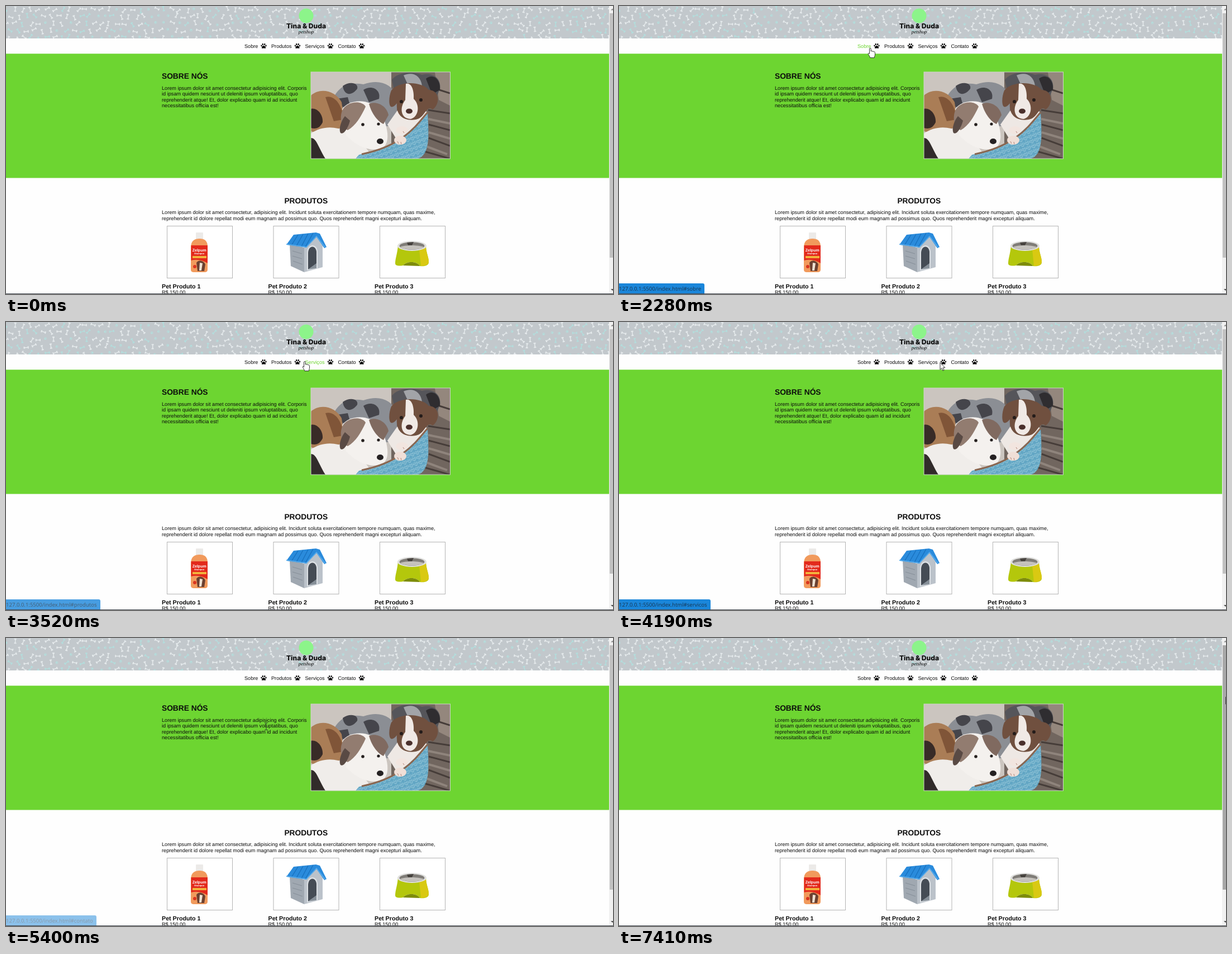
An HTML page for the animation above (8000 ms loop, 1087 px wide and 515 px high).

```html
<!DOCTYPE html>
<html lang="pt-BR">
<head>
<meta charset="utf-8">
<title>Petshop</title>
<style>
  html, body { margin: 0; width: 100%; height: 100%; overflow: hidden; background: #fefefe; }
  svg { position: absolute; left: 0; top: 0; display: block; }
  text { font-family: "Liberation Sans", Arial, sans-serif; font-size: 9.17px; fill: #0c0c0c; text-rendering: geometricPrecision; }
  .h2 { font-size: 13.75px; font-weight: 700; }
  .h3 { font-size: 10.7px; font-weight: 700; }
  .brand { font: 800 12.1px Inter, sans-serif; text-anchor: middle; }
  .script { font: italic 8.8px "Liberation Serif", serif; text-anchor: middle; }
  .label { font-weight: 700; fill: #fff; text-anchor: middle; }
  .card { fill: #fff; stroke: #b4b4b4; }
  #status {
    position: absolute; left: 0; top: 496px; height: 19px; padding-right: 6px; opacity: 0;
    background: #1a86da; color: #17344f; border-radius: 0 3px 0 0; white-space: nowrap;
    font: 9.55px/19px "Open Sans", "Noto Sans", sans-serif; text-rendering: geometricPrecision;
  }
</style>
</head>
<body>
<svg width="1087" height="515" viewBox="0 0 1087 515">
  <defs>
    <g id="bone">
      <path d="M-3.4 0H3.4" stroke="currentColor" stroke-width="1.5"/>
      <g fill="currentColor"><circle cx="-3.8" cy="-1" r="1.2"/><circle cx="-3.8" cy="1" r="1.2"/><circle cx="3.8" cy="-1" r="1.2"/><circle cx="3.8" cy="1" r="1.2"/></g>
    </g>
    <g id="paw">
      <path d="M0-.6C1.7-.6 3.6 1.8 3.6 3.2C3.6 4.9 1.6 4.1 0 4.1S-3.6 4.9-3.6 3.2C-3.6 1.8-1.7-.6 0-.6Z"/>
      <ellipse cx="-1.7" cy="-2.9" rx="1.2" ry="1.7" transform="rotate(-12 -1.7 -2.9)"/>
      <ellipse cx="1.7" cy="-2.9" rx="1.2" ry="1.7" transform="rotate(12 1.7 -2.9)"/>
      <ellipse cx="-4" cy="-.4" rx="1.1" ry="1.5" transform="rotate(-25 -4 -.4)"/>
      <ellipse cx="4" cy="-.4" rx="1.1" ry="1.5" transform="rotate(25 4 -.4)"/>
    </g>
    <pattern id="weave" width="9" height="9" patternUnits="userSpaceOnUse" patternTransform="rotate(-20)">
      <rect width="9" height="9" fill="#62a6c4"/><path d="M0 7L4.5 2L9 7M0 3L4.5-2L9 3" fill="none" stroke="#9bcbdc" stroke-width="1.1"/>
    </pattern>
    <clipPath id="frame"><rect x="546" y="118" width="249" height="155"/></clipPath>
    <clipPath id="top"><rect width="1080" height="58"/></clipPath>
  </defs>

  <rect width="1080" height="58" fill="#c2c8cc"/>
  <g id="bones" clip-path="url(#top)"></g>
  <circle cx="537.5" cy="17.5" r="13" fill="#8cf48a"/>
  <text class="brand" x="537.5" y="40.4">Tina &amp; Duda</text>
  <text class="script" x="537.5" y="48.8">petshop</text>
  <g id="nav"></g>

  <rect y="85.3" width="1080" height="222.2" fill="#6dd531"/>
  <text class="h2" x="279" y="130">SOBRE NÓS</text>
  <g id="about"></g>

  <g clip-path="url(#frame)">
    <path d="M546 118H795V273H546Z" fill="#cbc5bf"/>
    <path d="M690 118H795V273H690Z" fill="#71665f"/>
    <path d="M768 118H795V178L775 168Z" fill="#94877d"/>
    <path d="M756 186L795 192M757 212L795 222M757 236L795 250M742 258L795 273M776 150L795 156" stroke="#463d39" stroke-width="3"/>
    <path d="M756 202L795 210M757 226L795 237M750 250L790 265" stroke="#8f847c" stroke-width="4"/>
    <path d="M580 190C585 150 605 134 640 140C670 130 690 140 700 160V215H585Z" fill="#8b8e94"/>
    <path d="M603 143C615 134 632 137 629 148C620 160 606 162 603 143ZM640 150C655 140 672 150 668 166L650 172ZM592 166L612 163L617 181L590 180Z" fill="#45454b"/>
    <path d="M691 132C700 119 725 116 745 123C765 118 780 130 777 148L764 180L700 175Z" fill="#55555a"/>
    <path d="M712 124C728 117 742 124 745 142L722 146Z" fill="#a2a4a8"/>
    <path d="M752 130C765 119 779 132 777 150L763 158Z" fill="#2f2d30"/>
    <path d="M546 160C562 145 590 151 601 172L607 212C590 226 565 230 546 224Z" fill="#aa7d56"/>
    <path d="M572 163C587 158 603 176 604 203L587 206Z" fill="#805538"/>
    <path d="M546 184C557 181 568 194 567 208C561 220 553 220 546 218Z" fill="#382b27"/>
    <path d="M546 228C575 208 610 218 635 242L660 273H546Z" fill="#f0edea"/>
    <path d="M546 236C556 235 560 255 572 273H546Z" fill="#312b2a"/>
    <path d="M602 184C615 166 652 164 671 188C682 212 690 242 675 253C655 263 627 251 609 231Z" fill="#f4f1ee"/>
    <path d="M602 187C610 170 637 168 644 180C635 199 627 213 612 222C600 218 597 201 602 187Z" fill="#927c70"/>
    <path d="M650 175C666 169 682 180 685 195L676 211C666 207 655 193 650 175Z" fill="#806a60"/>
    <path d="M616 205C613 217 605 231 599 227C595 219 601 204 607 197Z" fill="#594a44"/>
    <circle cx="639" cy="212" r="2.8" fill="#25201f"/><circle cx="667" cy="211" r="2.6" fill="#25201f"/>
    <ellipse cx="670" cy="242" rx="6" ry="5" fill="#252122"/>
    <path d="M700 188C715 170 748 175 755 193L744 229L701 241L683 212Z" fill="#eee8e4"/>
    <path d="M690 151C702 135 742 133 757 150C778 151 777 177 764 185C752 176 751 200 734 203C710 207 698 193 700 174C684 193 684 165 690 151Z" fill="#70503f"/>
    <path d="M716 139C728 136 731 155 730 166C742 177 739 198 725 202C707 202 704 182 715 168Z" fill="#f0e9e5"/>
    <circle cx="708" cy="171" r="3" fill="#241c1a"/><circle cx="743" cy="168" r="3" fill="#241c1a"/>
    <ellipse cx="722" cy="188" rx="6" ry="4.5" fill="#4a302c"/>
    <path d="M755 189C733 212 712 249 632 266L626 273H738C760 264 757 232 755 189Z" fill="url(#weave)"/>
    <path d="M755 190C735 213 712 250 637 265" fill="none" stroke="#8a6650" stroke-width="3"/>
    <ellipse cx="709" cy="222" rx="11" ry="7" fill="#f2e5df"/><ellipse cx="706" cy="240" rx="11" ry="8" fill="#f0dfd7"/>
    <path d="M701 242L703 246M707 243L708 247M711 224L713 227" stroke="#b18378"/>
  </g>
  <rect x="546" y="118" width="249.5" height="155" fill="none" stroke="#cfd6ca"/>

  <text class="h2" x="537.3" y="352.6" text-anchor="middle">PRODUTOS</text>
  <g id="products"></g>

  <g>
    <rect x="340" y="405" width="13" height="14" rx="1" fill="#eceae8"/>
    <path d="M336 419C340 415 353 415 357 419C362 424 361 430 361 438V471C361 475 359 476 355 476H337C333 476 331 475 331 471V436C331 429 331 423 336 419Z" fill="#f19a5c"/>
    <path d="M331.5 428H361V460Q346 451 331.5 455Z" fill="#e32a1c"/>
    <path d="M334 447H359V451H334Z" fill="#f3b13c"/>
    <path d="M341 459C345 453 354 455 357 462L355 474H343Z" fill="#6b4030"/>
    <path d="M347 459L352 460L350 473H346Z" fill="#efe2d2"/>
    <circle cx="338" cy="466" r="3" fill="#d9351f"/>
    <text class="label" x="346.2" y="439" style="font-size:7px">Zelpum</text>
    <text class="label" x="346" y="444" style="font-size:4px">Shampoo</text>
  </g>
  <g>
    <path d="M508 426L534 432V476L510 465Z" fill="#a0a8b1"/>
    <path d="M534 432L555 411L567 429V467L534 476Z" fill="#bbc2ca"/>
    <path d="M539 473V440C540 425 556 424 558 438V469Z" fill="#dce0e4"/>
    <path d="M541 471V441C542 428 554 427 556 439V461Z" fill="#454c55"/>
    <path d="M541 471L556 460V469Z" fill="#868f98"/>
    <path d="M515 409L555 405L562 407L574 431L570 433L556 413L538 432L502 427Z" fill="#2a8bdc"/>
    <path d="M523 409L511 428M532 408L520 429M541 407L529 430M550 406L536 431" stroke="#1870bd" stroke-width="1.3"/>
    <path d="M502 426L538 431L556 412L572 432" fill="none" stroke="#59aceb" stroke-width="1.5"/>
    <path d="M513 438L530 443M513 447L530 452M514 456L531 462" stroke="#858e98"/>
  </g>
  <g>
    <path d="M702 428C701 442 697 452 697 460C697 465 704 465 711 464C718 456 736 456 741 465C750 466 758 464 757 457C757 449 752 440 752 428Z" fill="#b4c70c"/>
    <path d="M740 435L752 430C752 441 757 449 757 457C757 462 752 465 743 465Z" fill="#d9c912"/>
    <path d="M711 464C718 456 736 456 741 465Z" fill="#7d8c0a"/>
    <ellipse cx="727" cy="429" rx="26" ry="9" fill="#e0e0de"/>
    <ellipse cx="727" cy="429" rx="22.5" ry="6.8" fill="#807d78"/>
    <path d="M706 431C714 427 738 427 748 431C742 437 713 437 706 431Z" fill="#c5c2bd"/>
    <path d="M718 423L730 422L727 428H720Z" fill="#47433f"/>
  </g>

  <rect x="1080" width="7" height="515" fill="#f1f1f1"/>
  <rect id="thumb" x="1081" y="13" width="6" height="437"/>
  <path d="M1083 7.5L1086 4.5L1087 5.5V7.5Z" fill="#8c8c8c"/>
  <path d="M1083 506L1086 509L1087 508V506Z" fill="#505050"/>
</svg>
<div id="status"></div>
<svg width="1087" height="515" viewBox="0 0 1087 515">
  <rect y="514" width="1087" height="1" fill="#454a52"/>
  <g id="cursor" stroke-linejoin="round">
    <path id="arrow" d="M.5.5V13.2L3.4 10.5L5.4 15L7.5 14.1L5.6 9.8H9.5Z" fill="#fff" stroke="#222" stroke-width=".9"/>
    <path id="hand" d="M-1.5 1.8C-1.5 0 1.2 0 1.2 1.8V6C1.2 4.9 3.6 5 3.6 6.5C4 5.4 6 5.7 6 7.1C6.6 6.3 8.5 6.7 8.5 8.3V12C8.5 14 7.3 15 7.3 17.5H-.3C-.6 15.3-2.5 13.3-3.6 11C-4.3 9.3-2.6 8.8-1.5 10.5Z" fill="#fff" stroke="#222" stroke-width=".9"/>
    <path id="beam" d="M-3-6.5H-.8L0-6L.8-6.5H3M0-6V6M-3 6.5H-.8L0 6L.8 6.5H3" fill="none" stroke="#31452c"/>
  </g>
</svg>
<script>
const $ = id => document.getElementById(id);
const LOOP = 8000, TICK = 200 / 3;

const lines = (rows, x, y) => rows.map((s, i) => `<text x="${x}" y="${y + i * 10.4}">${s}</text>`).join('');

$('about').innerHTML = lines([
  'Lorem ipsum dolor sit amet consectetur adipisicing elit. Corporis',
  'id ipsam quidem nesciunt ut deleniti ipsum voluptatibus, quo',
  'reprehenderit atque! Et, dolor explicabo quam id ad incidunt',
  'necessitatibus officia est!'], 279, 150);

$('products').innerHTML = lines([
  'Lorem ipsum dolor sit amet consectetur, adipisicing elit. Incidunt soluta exercitationem tempore numquam, quas maxime,',
  'reprehenderit id dolore repellat modi eum magnam ad possimus quo. Quos reprehenderit magni excepturi aliquam.'], 279, 372.3) +
  [1, 2, 3].map((n, i) => {
    const x = 279 + i * 190.5;
    return `<rect class="card" x="${x + 9.5}" y="393.5" width="117" height="93"/>
      <text class="h3" x="${x}" y="504.5">Pet Produto ${n}</text><text x="${x}" y="515.4">R$ 150,00</text>`;
  }).join('');

const links = [['Sobre', 427, 461.5], ['Produtos', 475, 522], ['Serviços', 535.5, 581], ['Contato', 594.5, 637]];
$('nav').innerHTML = links.map(([name, x, paw]) =>
  `<text x="${x}" y="74.6">${name}</text><use href="#paw" x="${paw}" y="71.5"/>`).join('');
const navText = [...$('nav').querySelectorAll('text')];

// Scattered bones and paws in the header
let seed = 7;
const rnd = () => (seed = seed * 16807 % 2147483647) / 2147483647;
let bones = '';
for (let row = 0; row < 5; row++) {
  for (let col = 0; col < 78; col++) {
    const x = col * 14 + (row % 2) * 7 + rnd() * 5, y = 4 + row * 12.5 + rnd() * 5, mint = rnd() < .4;
    const shape = mint && rnd() < .6 ? 'paw' : 'bone';
    bones += `<use href="#${shape}" transform="translate(${x} ${y}) rotate(${rnd() * 360}) scale(${shape === 'paw' ? .5 : .95})"
      color="${mint ? '#b2dedd' : '#e6ebed'}" fill="#b2e0de"/>`;
  }
}
$('bones').innerHTML = bones;

// time, x, y of the hotspot, then the pointer shape when it changes
const path = [
  [266, 993, 492, 'arrow'], [333, 935, 400], [400, 830, 300], [466, 740, 238], [733, 740, 238], [800, 690, 214],
  [1000, 485, 108], [1067, 461, 97], [1400, 442, 76], [1599, 442, 76, 'hand'], [1867, 442, 76], [2267, 450, 75],
  [2399, 455, 73, 'arrow'], [2599, 478, 72, 'hand'], [3000, 490, 70], [3267, 508, 66], [3333, 514, 64, 'arrow'],
  [3467, 529, 65], [3533, 535, 70, 'hand'], [3800, 548, 66], [4067, 566, 70], [4133, 571, 71, 'arrow'],
  [4200, 574.5, 72], [4333, 587, 72], [4399, 600, 74, 'hand'], [4533, 606, 73], [4800, 606, 73],
  [4866, 596, 82, 'arrow'], [5067, 540, 115], [5199, 490, 142, 'beam'], [5400, 466, 158], [5467, 490, 162],
  [5533, 548, 170, 'arrow'], [5600, 593, 175], [5867, 753, 198], [6133, 753, 198], [6400, 980, 140], [6600, 1086, 105]];
let last;
for (const key of path) last = key[3] = key[3] || last;

const fade = [[1800, 0], [2000, 1], [2533, 1], [2667, .5], [2800, 1], [3467, 1], [3533, .8], [3667, .4], [3800, 1],
  [5200, 1], [5400, .5], [5600, 0]];

// Last key reached, and a mix towards the next one
function at(keys, t) {
  let i = 0;
  while (i < keys.length - 1 && keys[i + 1][0] <= t) i++;
  const a = keys[i], b = keys[i + 1] || a;
  const k = b === a ? 0 : Math.max(0, (t - a[0]) / (b[0] - a[0]));
  return { key: a, mix: n => a[n] + (b[n] - a[n]) * k };
}

function draw(now) {
  const t = Math.floor((now % LOOP + 27) / TICK) * TICK;
  const pos = at(path, t), shape = pos.key[3], x = pos.mix(1);
  $('cursor').setAttribute('transform', `translate(${x} ${pos.mix(2)})`);
  $('cursor').style.display = t < 266 ? 'none' : '';
  for (const id of ['arrow', 'hand', 'beam']) $(id).style.display = id === shape ? '' : 'none';

  navText.forEach((el, i) => {
    const over = shape === 'hand' && x >= links[i][1] - 1 && x < links[i][2] - 8;
    el.style.fill = over ? '#6dd531' : '';
  });

  const hash = t < 2660 ? 'sobre' : t < 3600 ? 'produtos' : t < 4399 ? 'servicos' : 'contato';
  $('status').textContent = '127.0.0.1:5500/index.html#' + hash;
  $('status').style.opacity = at(fade, t).mix(1);
  $('thumb').style.fill = t < 6599 ? '#c1c1c1' : t > 6999 && t < 7399 ? '#787878' : '#a8a8a8';
  requestAnimationFrame(tick);
}
const start = performance.now();
function tick() { draw(performance.now() - start); }
tick();
</script>
</body>
</html>
```
